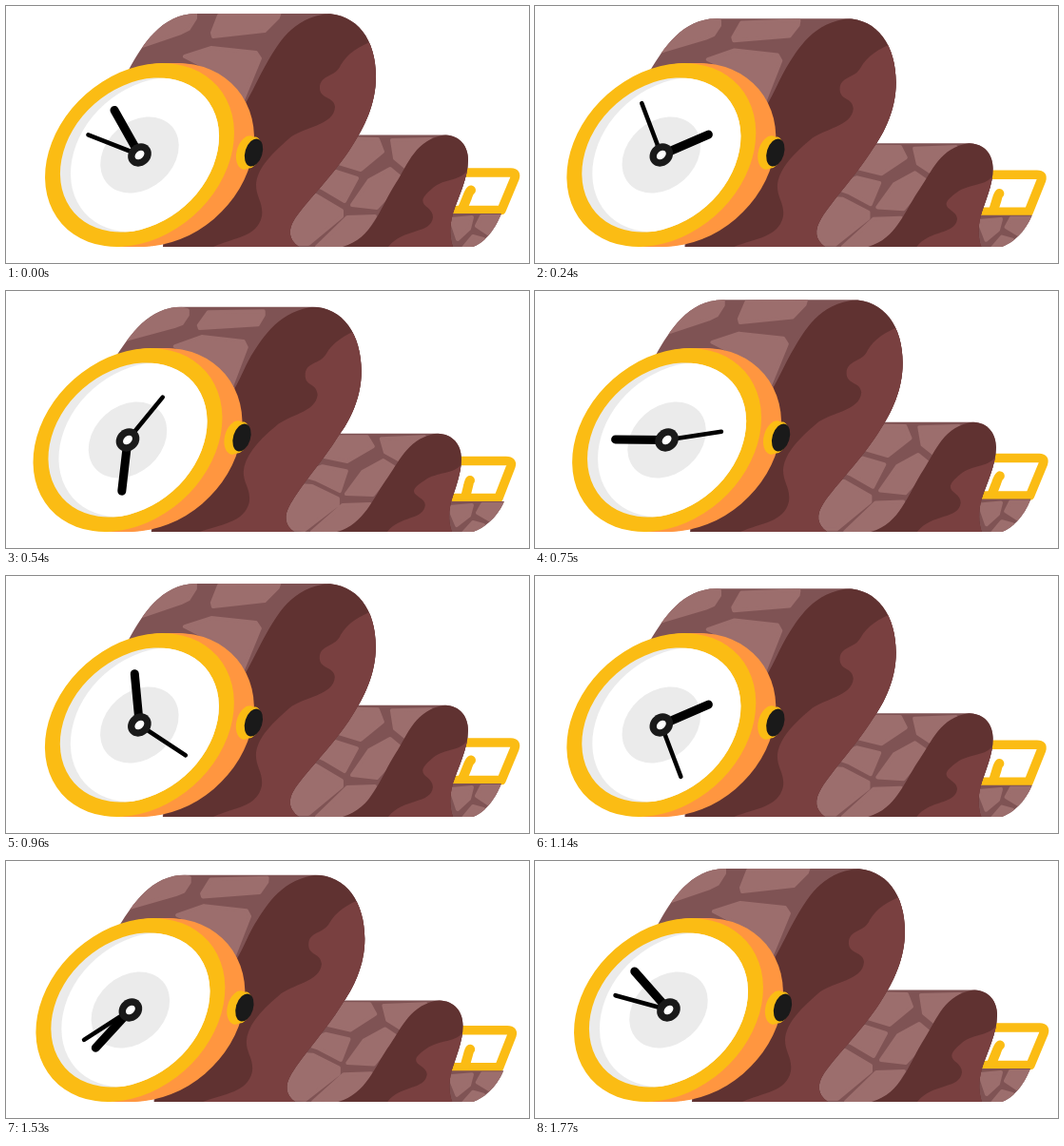
Recreate the animation shown at these times as an HTML page with a canvas. Size 550 px wide and 270 px high, loop 1.8 s.

```html
<!DOCTYPE html>
<html lang="en">
<head>
<meta charset="utf-8">
<title>Snake watch</title>
<style>
html, body { margin: 0; width: 100%; height: 100%; overflow: hidden; background: #fff; }
canvas { display: block; }
</style>
</head>
<body>
<canvas id="stage" width="550" height="270"></canvas>
<script>
const ctx = document.getElementById('stage').getContext('2d');
const LOOP = 1800, BREATH = 900, DEPTH = 1.05;
const GOLD = '#fbbc14', ORANGE = '#ff9640', INK = '#1a1a1a', GREY = '#ebebeb';
const SKIN = '#7f5354', SPOT = '#9c6e6d', DARK = '#603231', RED = '#794040';

// Each shape is a pair of paths: body raised, body lowered.
const neck = {
  outline: [
    'M165,253 V120 L129,67 C143,42 163,8 200,8 H335 C370,8 389,36 389,74 C389,103 377,127 364,147 C346,176 318,203 304,223 C296,235 297,245 308,253 Z',
    'M153,253 V120 L117,67 C131,46 150,16.5 185,16.5 H322 C355,16.5 374,46 374,84 C374,112 362,136 350,152 C334,178 311,203 299,224 C292,236 293,246 303,253 Z'],
  dark: [
    'M340,8 C300,12 286,40 272,64 C262,82 257,95 247,110 L165,253 H320 L400,120 V0 Z',
    'M326,16 C288,20 272,46 258,68 C250,82 246,95 236,110 L153,253 H315 L385,130 V0 Z'],
  red: [
    'M388,36 C371,42 359,50 352,62 C347,75 329,72 330,87 C331,98 345,95 346,106 C345,126 312,127 298,139 C276,158 264,172 263,188 C263,201 271,207 269,221 C264,243 240,243 218,253 H320 L400,130 V36 Z',
    'M372,40 C356,46 343,55 337,66 C330,78 314,74 315,90 C316,100 327,97 328,109 C326,128 297,130 284,142 C263,159 251,175 250,190 C250,203 258,208 256,222 C251,243 227,245 204,253 H315 L390,130 V40 Z'],
  spots: [
    'M120,46 L150,0 L199,8 L199,13 L192,24 L184,28 L140,43 Z M224,10 L288,6 L286,12 L272,26 L218,32 L217,28 Z M188,53 L216,44 L263,49 L267,55 L246,106 L225,72 Z',
    'M108,55 L140,8 L191,20 L191,25 L185,34 L177,37 L129,50 Z M213,22 L271,21 L271,25 L265,35 L204,39 L203,36 Z M178,58 L206,48 L250,53 L253,59 L235,106 L213,73 Z']
};

const hump = {
  outline: [
    'M250,253 L330,135.5 H462 C478,136 486,148 486,162 C486,181 475,202 470,218 C466,232 467,244 470,253 Z',
    'M246,253 L320,149.5 H454 C470,150 479,161 479,176 C479,192 472,208 468,222 C465,235 466,245 469,253 Z'],
  dark: [
    'M463,135 C430,140 423,166 410,186 C393,212 386,244 354,253 H480 L495,135 Z',
    'M455,149 C424,153 415,177 402,195 C386,217 377,245 348,253 H480 L490,149 Z'],
  red: [
    'M487,169 C481,185 462,180 449,191 C425,211 449,208 449,222 C447,240 418,233 402,253 H480 L495,169 Z',
    'M480,180 C474,193 454,189 440,199 C415,215 441,214 441,225 C439,241 414,236 401,253 H480 L490,180 Z'],
  spots: [
    'M280,242 L310,198 L326,199 L353,215 L353,221 L318,250 L300,250 Z M340,139 L391,140 L396,153 L373,172 L350,165 Z M320,186 L347,174 L369,181 L356,205 L334,192 Z M364,209 L382,183 L404,171 L416,181 L402,199 L390,212 Z M406,141 L447,140 L431,153 L421,170 L409,160 Z M359,222 L388,221 L375,241 L350,256 L327,253 Z',
    'M276,243 L306,204 L322,205 L349,218 L349,224 L314,251 L297,250 Z M330,153 L380,153 L386,163 L359,179 L335,174 Z M310,193 L333,184 L358,189 L351,210 L327,198 Z M358,213 L375,190 L397,178 L410,186 L397,200 L386,214 Z M395,155 L440,153 L424,164 L413,177 L399,169 Z M354,225 L383,224 L370,242 L345,256 L322,253 Z']
};

const tail = {
  outline: [
    'M460,218 H521 C513,238 502,249 491,253 H460 Z',
    'M460,221 H524 C515,240 503,249 491,253 H460 Z'],
  spots: [
    'M468,224 L490,222 L487,234 L475,245 Z M500,221 L525,221 L507,239 L495,231 Z M481,254 L491,242 L502,245 L490,256 Z',
    'M466,227 L490,225 L487,236 L474,246 Z M501,224 L527,224 L508,240 L496,233 Z M481,254 L491,243 L502,246 L490,256 Z']
};

const buckle = {
  frame: ['M470,175 H531 Q537,175 535,181 L521,214.5 H470',
          'M470,178.5 H526 Q533,178.5 531,184 L518,217.5 H468'],
  prong: ['M480,213 L485,201 Q487,195 489,193.5', 'M483,217 L486,205 Q487,200 488,199']
};

function blend([a, b], k) {
  const num = /-?\d+(\.\d+)?/g, end = b.match(num);
  let i = 0;
  return new Path2D(a.replace(num, n => +n + (end[i++] - n) * k));
}

function fill(path, color) {
  ctx.fillStyle = color;
  ctx.fill(path);
}

function line(path, color, width) {
  ctx.strokeStyle = color;
  ctx.lineWidth = width;
  ctx.stroke(path);
}

function drawBody(part, k) {
  const outline = blend(part.outline, k), spots = blend(part.spots, k);
  ctx.save();
  fill(outline, SKIN);
  ctx.clip(outline);
  fill(spots, SPOT);
  line(spots, SPOT, 4);
  if (part.dark) fill(blend(part.dark, k), DARK);
  if (part.red) fill(blend(part.red, k), RED);
  ctx.restore();
}

function oval(x, y, rx, ry, degrees) {
  const path = new Path2D();
  path.ellipse(x, y, rx, ry, degrees * Math.PI / 180, 0, 2 * Math.PI);
  return path;
}

const disc = (size, x = 0) => oval(x, 0, 109.2 * size, 85.3 * size, -41.4);

function hand(degrees, length, width) {
  const a = degrees * Math.PI / 180;
  line(new Path2D(`M0,0 L${length * Math.sin(a)},${-length * Math.cos(a)}`), '#000', width);
}

function drawWatch(t, k) {
  ctx.save();
  ctx.translate(140.5 - 12.3 * k, 156.5);
  for (let x = 9; x <= 21; x += 3) fill(oval(x, 0, 106.9, 88.2, -40.4), ORANGE);
  fill(oval(113, -2.5, 11, 18, 15), GOLD);
  fill(oval(118, -2.5, 9.5, 17, 15), GOLD);
  fill(oval(120, -2.5, 9, 15, 17), INK);
  fill(disc(1), GOLD);

  ctx.save();
  const face = disc(0.84);
  fill(face, GREY);
  ctx.clip(face);
  fill(disc(0.84, 11), '#fff');
  ctx.restore();
  fill(disc(0.415), GREY);

  hand(-29.4 + 720 * t / LOOP, 54, 9);
  hand(-68.7 + 360 * t / LOOP, 58, 4.6);
  fill(oval(0, 0, 13, 11.4, -41.4), INK);
  fill(oval(0, 0, 5.6, 4, -41.4), '#fff');
  ctx.restore();
}

function draw(now) {
  const t = now % LOOP;
  const u = 1 - Math.abs(1 - (t % BREATH) / (BREATH / 2));
  const k = DEPTH * (u < 0.5 ? 4 * u ** 3 : 1 - 4 * (1 - u) ** 3);
  ctx.clearRect(0, 0, 550, 270);
  ctx.lineCap = ctx.lineJoin = 'round';
  line(blend(buckle.frame, k), GOLD, 9.6);
  line(blend(buckle.prong, k), GOLD, 10);
  drawBody(tail, k);
  drawBody(hump, k);
  drawBody(neck, k);
  drawWatch(t, k);
}

let start;
function tick(now) {
  start ??= now;
  draw(now - start);
  requestAnimationFrame(tick);
}
draw(0);
requestAnimationFrame(tick);
</script>
</body>
</html>
```
